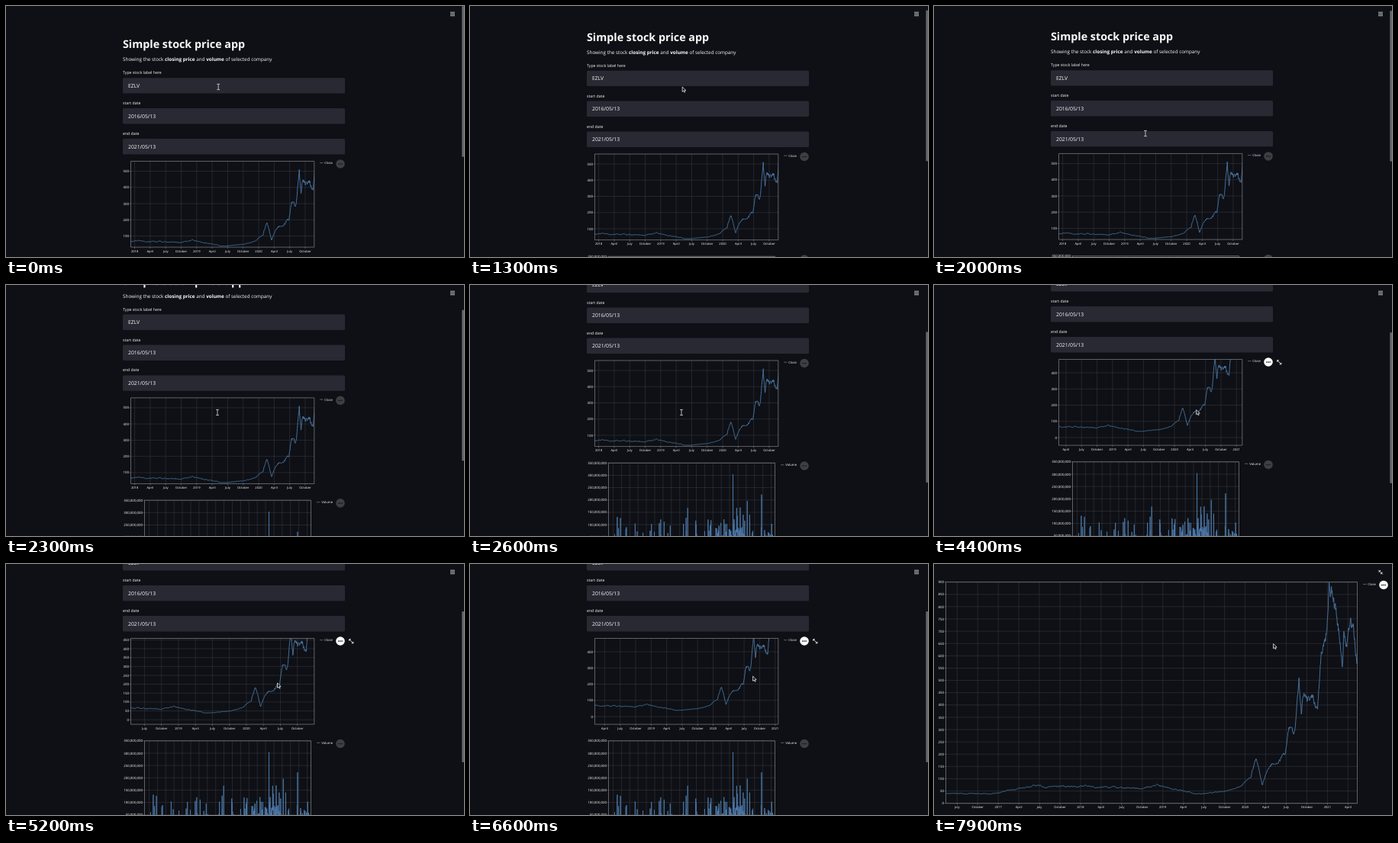
These frames come from a looping animation (600x329 px, 8 s). An HTML page:

```html
<!DOCTYPE html>
<html lang="en">
<head>
<meta charset="utf-8">
<title>Simple stock price app</title>
<style>
  html, body { margin: 0; width: 100%; height: 100%; overflow: hidden; background: #0e1015; }
  svg { display: block; font-family: "Open Sans", "Noto Sans", sans-serif; text-rendering: geometricPrecision; }
  body > svg { width: 100vw; height: 100vh; }
</style>
</head>
<body>
<svg id="stage" viewBox="0 0 600 329"></svg>
<script>
const LOOP = 8000, STEP = 100;
const BG = '#0e1015', INK = '#fafafa', LINE = '#4c78a8', GRID = '#3e3f44', FRAME = '#97989c';
const stage = document.getElementById('stage');

const clamp = (v, low, high) => Math.min(high, Math.max(low, v));
const mix = (a, b, u) => a + (b - a) * u;

function ease(t, from, to) {
  const u = clamp((t - from) / (to - from), 0, 1);
  return u * u * (3 - 2 * u);
}

function seeded(seed) {
  return () => (seed = (seed * 16807) % 2147483647) / 2147483647;
}

// ---- Data: days as offsets in years from the start of 2020 ----
const FIRST = -3.637, LAST = 1.363, DAYS = 1258;
const days = Array.from({ length: DAYS }, (_, i) => mix(FIRST, LAST, i / (DAYS - 1)));

const turningPoints = [
  [-3.64, 41], [-3.1, 38], [-2.55, 70], [-1.9, 67], [-1.3, 60], [-1.05, 72], [-0.58, 38],
  [-0.2, 50], [-0.05, 70], [0.07, 115], [0.135, 184], [0.21, 76], [0.3, 146], [0.49, 202],
  [0.53, 305], [0.6, 290], [0.655, 480], [0.685, 350], [0.71, 440], [0.88, 405], [0.92, 585],
  [1, 720], [1.02, 860], [1.07, 855], [1.183, 570], [1.2, 695], [1.235, 615], [1.28, 755],
  [1.364, 590]
];
function trend(day) {
  const i = turningPoints.findIndex(([d]) => d >= day);
  const [a, va] = turningPoints[Math.max(0, i - 1)], [b, vb] = turningPoints[i];
  return mix(va, vb, (day - a) / (b - a));
}

const priceRandom = seeded(4217);
let wobble = 0;
const closes = days.map(day => {
  wobble = wobble * 0.88 + (priceRandom() - 0.5) * 0.058;
  return trend(day) * (1 + wobble);
});

const volumeRandom = seeded(9151);
const volumes = days.map(day => {
  const rush = Math.exp(-(((day - 0.27) / 0.22) ** 2));
  const usual = (20 + 45 * rush) * (0.6 + 0.8 * volumeRandom());
  return usual + 110 * volumeRandom() ** 26;
});
for (const [day, v] of [[-1.26, 168], [0.1, 304], [0.53, 196], [0.96, 222]]) {
  volumes[days.findIndex(d => d >= day)] = v;
}

// ---- Drawing helpers ----
const text = (x, y, str, size, { anchor = 'start', weight = 500, fill = INK } = {}) =>
  `<text x="${x}" y="${y + size * 0.36}" font-size="${size}" text-anchor="${anchor}"` +
  ` font-weight="${weight}" fill="${fill}">${str}</text>`;

const rect = (x, y, w, h, fill, rx = 0) =>
  `<rect x="${x}" y="${y}" width="${w}" height="${h}" rx="${rx}" fill="${fill}"/>`;

const stroke = (d, color, width) =>
  `<path d="${d}" fill="none" stroke="${color}" stroke-width="${width}" stroke-linejoin="round"/>`;

const at = (x, y, body) => `<g transform="translate(${x} ${y})">${body}</g>`;

function menuButton(x, y, active) {
  const dots = [-2.2, 0, 2.2].map(dx =>
    `<circle cx="${dx}" r=".85" fill="${active ? BG : '#191a1e'}"/>`).join('');
  return at(x, y, `<circle r="5.8" fill="${active ? '#fff' : '#3e3f43'}"/>${dots}`);
}

const expandIcon = (x, y) =>
  at(x, y, stroke('M-2.6-.4V-2.6H-.4M-2.6-2.6L2.6 2.6M.4 2.6H2.6V.4', '#eee', 0.9));
const collapseIcon = (x, y) =>
  at(x, y, stroke('M-2.8-2.8L-.6-.6M-.6-2.6V-.6H-2.6M2.8 2.8L.6.6M.6 2.6V.6H2.6', '#eee', 0.9));

const legend = (x, y, name) => stroke(`M${x} ${y}h4.4`, LINE, 0.8) + text(x + 6.3, y, name, 4.2);

function niceStep(span, count) {
  const raw = span / count, power = 10 ** Math.floor(Math.log10(raw)), ratio = raw / power;
  return power * (ratio >= 7.07 ? 10 : ratio >= 3.16 ? 5 : ratio >= 1.41 ? 2 : 1);
}

// box: plot area; view: screen place of (2020, 0) and pixels per year / per unit
function chart(box, view, values, unit = 1) {
  const { x, y, w, h } = box, right = x + w, bottom = y + h;
  const X = day => view.x + day * view.sx, Y = v => view.y - v * view.sy;
  let grid = '', ticks = '', labels = '', line = '';

  for (let q = Math.ceil((x - view.x) / view.sx * 4); X(q / 4) <= right; q++) {
    const px = X(q / 4), quarter = ((q % 4) + 4) % 4;
    const name = quarter ? ['April', 'July', 'October'][quarter - 1] : 2020 + q / 4;
    grid += `M${px} ${y}V${bottom}`;
    ticks += `M${px} ${bottom}v2`;
    labels += text(px, bottom + 5.1, name, 4.1, { anchor: 'middle' });
  }

  const step = niceStep(h / view.sy, Math.ceil(h / 16.67));
  const low = Math.ceil((view.y - bottom) / view.sy / step - 0.01) * step + 0;
  for (let v = low; Y(v) >= y - 0.1; v += step) {
    grid += `M${x} ${Y(v)}H${right}`;
    ticks += `M${x} ${Y(v)}h-2`;
    labels += text(x - 2.5, Y(v), (v * unit).toLocaleString('en-US'), 4.4, { anchor: 'end' });
  }

  days.forEach((day, i) => {
    const px = X(day);
    if (px < x - 3 || px > right + 3) return;
    line += `${line ? 'L' : 'M'}${px.toFixed(2)} ${Y(values[i]).toFixed(2)}`;
  });
  return stroke(grid, GRID, 0.48) + stroke(ticks, FRAME, 0.45) +
    `<svg x="${x}" y="${y}" width="${w}" height="${h}" viewBox="${x} ${y} ${w} ${h}">` +
    stroke(line, LINE, 0.9) + '</svg>' +
    stroke(`M${x} ${y}h${w}v${h}h${-w}z`, FRAME, 0.6) + labels;
}

function tooltip(x, y) {
  const rows = [['Date:', 'May 22, 2020'], ['value:', '163.37600708'], ['variable:', 'Close']];
  return rect(x, y, 57.2, 33.2, '#f8f8f9', 1) + rows.map(([key, value], i) => {
    const middle = y + 8.2 + i * 8.7;
    return text(x + 21.3, middle, key, 4.15, { anchor: 'end', fill: '#85868a' }) +
      text(x + 23.7, middle, value, 4.5, { fill: '#111' });
  }).join('');
}

const arrow = `<path d="M0 0V6.3L1.5 5L2.5 7.2L3.6 6.7L2.6 4.6H4.7Z" fill="#111" stroke="#fff" stroke-width=".7"/>`;
const beam = stroke('M-1.9-3.6H1.9M0-3.6V3.6M-1.9 3.6H1.9', '#c9c9cc', 0.9);

// ---- Motion ----
const moves = [
  { from: 1400, to: 1700, x: 277, y: 167 },
  { from: 2800, to: 3100, x: 342, y: 181 },
  { from: 3100, to: 3600, x: 283, y: 164.2, drag: true },
  { from: 3600, to: 3800, x: 300.5, y: 163.5 },
  { from: 3900, to: 4500, x: 347, y: 163.5, drag: true },
  { from: 4800, to: 4900, x: 355.5, y: 156 },
  { from: 6400, to: 7200, x: 452, y: 98.5 },
  { from: 7800, to: 7900, x: 444.5, y: 104.5 }
];

// Cursor place, and how far the chart has been dragged
function pointer(t) {
  const p = { x: 278.2, y: 106, panX: 0, panY: 0 };
  for (const { from, to, x, y, drag } of moves) {
    const u = ease(t, from, to), dx = (x - p.x) * u, dy = (y - p.y) * u;
    if (drag) { p.panX += dx; p.panY += dy; }
    p.x += dx;
    p.y += dy;
    if (t < to) break;
  }
  return p;
}

const scrollAt = t => 9.5 * ease(t, 700, 1000) + 96.5 * ease(t, 1970, 2650);
const zoomAt = t => 1 + 0.13 * (ease(t, 4800, 5400) - ease(t, 5600, 6100));

const priceBox = { x: 163.5, y: 203.5, w: 240.3, h: 112.6 };
const volumeBox = { x: 181.5, y: 337.8, w: 218, h: 113.1 };
const fullBox = { x: 15.5, y: 23.7, w: 539, h: 290 };

const wholeView = ({ x, y, w, h }, top) => {
  const sx = w / (LAST - FIRST);
  return { x: x - FIRST * sx, y: y + h, sx, sy: h / top };
};

function priceView(t) {
  const { panX, panY } = pointer(t), zoom = zoomAt(t);
  return {
    x: mix(355.5, 331 + panX, zoom), y: mix(262, 322.75 + panY, zoom),
    sx: 81.2 * zoom, sy: 0.2125 * zoom
  };
}

// ---- Scenes ----
const field = (y, label, value) =>
  text(153, y - 17, label, 5.2) + rect(153, y - 10.2, 291, 20.4, '#282933', 1.5) +
  text(160, y, value, 6.8);

const intro = text(153, 50, 'Simple stock price app', 14.3, { weight: 700 }) +
  text(153, 70, 'Showing the stock <tspan font-weight="700">closing price</tspan> and ' +
    '<tspan font-weight="700">volume</tspan> of selected company', 6.35) +
  field(104.4, 'Type stock label here', 'EZLV') +
  field(144.3, 'start date', '2016/05/13') +
  field(184.2, 'end date', '2021/05/13');

const volumePanel = chart(volumeBox, wholeView(volumeBox, 350), volumes, 1e6) +
  legend(407, 340.3, 'Volume') + menuButton(438, 341.5, false);

const fullScreen = chart(fullBox, wholeView(fullBox, 900), closes) +
  legend(562, 26.5, 'Close') + menuButton(589, 27.5, true) + collapseIcon(585, 10.7);

function page(t) {
  const scroll = scrollAt(t), hover = t >= 2900;
  const content = intro + chart(priceBox, priceView(t), closes) +
    legend(411, 205.7, 'Close') + menuButton(438, 207, hover) +
    (hover ? expandIcon(452.3, 207.3) : '') + volumePanel;
  return at(0, -scroll, content) +
    stroke('M582 8.3h6M582 10.5h6M582 12.7h6', '#e4e4e6', 0.9) +
    rect(597.3, scroll * 0.585, 2.7, 198, '#66676a', 1.3);
}

function render(t) {
  const { x, y } = pointer(t);
  const within = (from, to) => t >= from && t < to;
  const overText = within(0, 1300) || within(1700, 2900);
  const showTip = within(3700, 3900) || within(4500, 4900);
  stage.innerHTML = rect(0, 0, 600, 329, BG) + (t >= 7500 ? fullScreen : page(t)) +
    (showTip ? tooltip(x + 8.9, y + 6.5) : '') + at(x, y, overText ? beam : arrow);
}

const start = performance.now();
let shown = -1;
function tick() {
  const step = Math.floor(((performance.now() - start) % LOOP) / STEP);
  if (step !== shown) render((shown = step) * STEP);
  requestAnimationFrame(tick);
}
tick();
</script>
</body>
</html>
```
